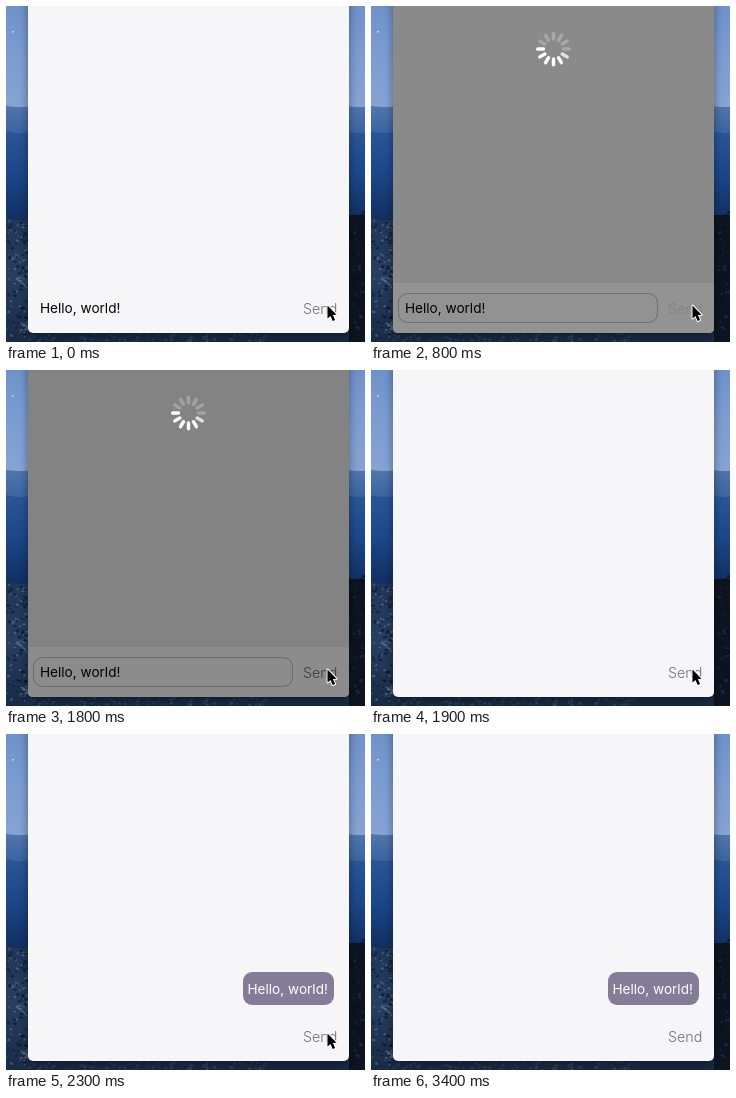
An HTML page with a canvas that plays this animation: 359 by 336 pixels, repeating every 3.5 s.

```html
<!DOCTYPE html>
<html lang="en">
<head>
<meta charset="utf-8">
<title>Send message</title>
<style>
  html, body { margin: 0; width: 100%; height: 100%; overflow: hidden; background: #10151f; }
  canvas { display: block; width: 359px; height: 336px; }
</style>
</head>
<body>
<canvas id="stage" width="359" height="336"></canvas>
<script>
const LOOP = 3500, STEP = 100;
const W = 359, H = 336;
const MESSAGE = 'Hello, world!';
const ctx = document.getElementById('stage').getContext('2d');
const ramp = (t, from, to) => Math.max(0, Math.min(1, (t - from) / (to - from)));

function box(x, y, w, h, r, fill) {
  ctx.beginPath();
  ctx.roundRect(x, y, w, h, r);
  ctx.fillStyle = fill;
  ctx.fill();
}

function text(str, x, y, color, size = 13.6, weight = 400) {
  ctx.font = `${weight} ${size}px Inter, sans-serif`;
  ctx.fillStyle = color;
  ctx.fillText(str, x, y);
}

function gradient(y0, y1, ...colors) {
  const g = ctx.createLinearGradient(0, y0, 0, y1);
  colors.forEach((c, i) => g.addColorStop(i / (colors.length - 1), c));
  return g;
}

// Fills everything below a wavy skyline
function ridge(y, height, fill) {
  ctx.beginPath();
  ctx.moveTo(0, H);
  for (let x = 0; x <= W; x++) ctx.lineTo(x, y + height * Math.sin(x / 9));
  ctx.lineTo(W, H);
  ctx.fillStyle = fill;
  ctx.fill();
}

function landscape() {
  let seed = 7;
  const rnd = () => (seed = seed * 16807 % 2147483647) / 2147483647;
  const speckle = (count, x, w, y, h, color) => {
    for (let i = 0; i < count; i++)
      box(x + rnd() * w, y + rnd() * h, 1 + rnd() * 3, 1 + rnd() * 2, 1, color);
  };
  box(0, 0, W, H, 0, gradient(0, 100, '#6f92cb', '#7c9dd2', '#86a3d2'));
  box(6, 25, 1.5, 1.5, 0, '#dbe6f5');
  ridge(100, 1, gradient(98, 215, '#5377ad', '#335d9d', '#1f4b91', '#123468'));
  ridge(125, 2, gradient(122, 215, '#2b5798', '#1b4689', '#102e5e'));
  ridge(211, 3, gradient(208, H, '#1f3557', '#263e60', '#182a45'));
  speckle(70, 0, 22, 214, 118, '#6d83a480');
  speckle(70, 0, 22, 214, 118, '#0b1728b0');
  box(343, 209, 16, 127, 0, '#0b1420');
  speckle(40, 341, 18, 203, 110, '#09101ac0');
  speckle(30, 346, 13, 214, 110, '#22375480');
  speckle(90, 22, 240, 327, 9, '#3d557a80');
}

function panel() {
  ctx.save();
  ctx.shadowColor = 'rgba(0,0,0,.4)';
  ctx.shadowBlur = 10;
  ctx.shadowOffsetY = 4;
  box(22, -40, 321, 367, 5, '#f6f6f8');
  ctx.restore();
}

function dimmed(t) {
  const drop = 7 * ramp(t, 800, 1200);
  const grey = v => `rgb(${v - drop},${v - drop},${v - drop})`;
  box(22, -40, 321, 367, 5, grey(138));
  box(22, 277, 321, 50, [0, 0, 5, 5], grey(147));
  box(27.5, 287.5, 259, 29, 9, grey(146));
  ctx.strokeStyle = grey(112);
  ctx.lineWidth = 1;
  ctx.stroke();
}

function spinner(t) {
  const head = 9 + Math.floor(12 * (t - 800) / 1000);
  ctx.save();
  ctx.translate(182.5, 43);
  ctx.lineWidth = 3.4;
  ctx.lineCap = 'round';
  for (let age = 0; age < 12; age++) {
    ctx.save();
    ctx.rotate((head - age) * Math.PI / 6);
    ctx.strokeStyle = `rgba(255,255,255,${Math.max(.25, 1 - (age / 6) ** 8)})`;
    ctx.beginPath();
    ctx.moveTo(0, -10);
    ctx.lineTo(0, -15.8);
    ctx.stroke();
    ctx.restore();
  }
  ctx.restore();
}

function pointer(x, y) {
  const arrow = new Path2D('M0 0V13L3 10.4L5.2 15.6L7.6 14.6L5.4 9.5L9 9.3Z');
  ctx.save();
  ctx.translate(x, y);
  ctx.strokeStyle = '#fff';
  ctx.lineWidth = 2;
  ctx.lineJoin = 'round';
  ctx.stroke(arrow);
  ctx.fillStyle = '#000';
  ctx.fill(arrow);
  ctx.restore();
}

function draw(t) {
  const loading = t >= 800 && t < 1900;
  landscape();
  panel();
  if (loading) {
    dimmed(t);
    spinner(t);
  }
  if (t < 1900) text(MESSAGE, 34, 306.5, '#000');

  // The pressed button vanishes, then fades back in
  ctx.globalAlpha = t < 700 ? 1 : ramp(t, 700, 1200);
  text('Send', 297, 307.5, loading ? '#3c3b44' : '#716d7b', 14.3, 300);

  ctx.globalAlpha = ramp(t, 2000, 2300);
  box(237, 238, 91, 33, 9, '#857c97');
  text(MESSAGE, 241.5, 260, '#fff');
  ctx.globalAlpha = 1;

  if (t < 3100) pointer(321.5, t < 3000 ? 299.5 : 304);
}

const start = performance.now();
function frame() {
  const t = (performance.now() - start) % LOOP;
  draw(Math.floor(t / STEP) * STEP);
  requestAnimationFrame(frame);
}
frame();
</script>
</body>
</html>
```
